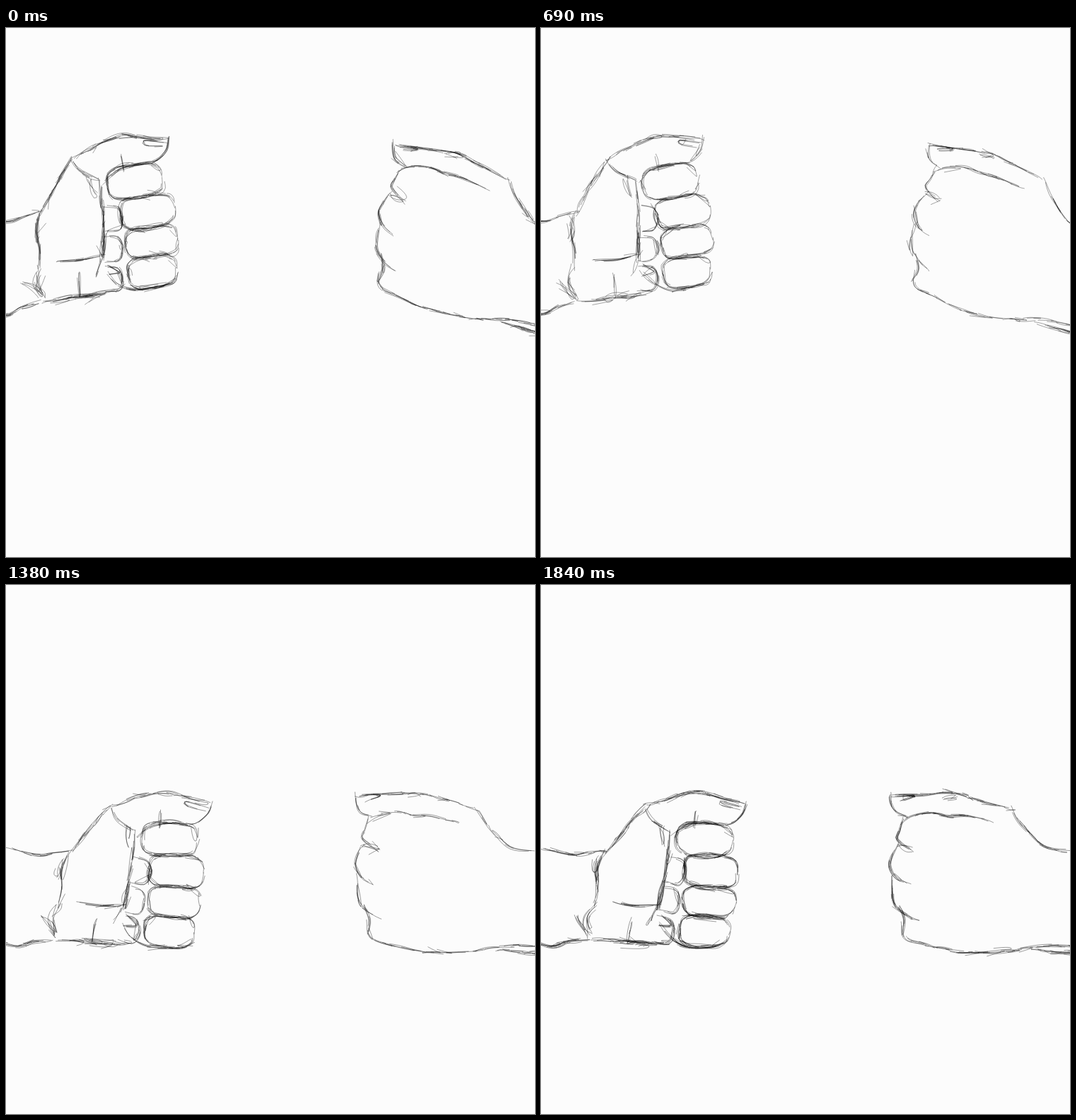
Recreate the animation shown at these times as an HTML page with a canvas. Size 748 px wide and 748 px high, loop 2.07 s.

```html
<!DOCTYPE html>
<html lang="en">
<head>
<meta charset="utf-8">
<title>Two fists</title>
<style>
html, body { margin: 0; width: 100%; height: 100%; overflow: hidden; background: #fcfcfc; }
canvas { display: block; width: 748px; height: 748px; }
</style>
</head>
<body>
<canvas id="stage" width="748" height="748"></canvas>
<script>
const SIZE = 748, HOLD = 230, PAPER = '#fcfcfc';

// Spread across the line, layers of hair, chance of a hook
const PENS = {
  fine: { spread: 1, layers: 2.2, hook: 0.08 },
  soft: { spread: 1.7, layers: 3.4, hook: 0.2 },
  dark: { spread: 2.3, layers: 4.8, hook: 0.22 },
  rough: { spread: 4.2, layers: 4, hook: 0.5 }
};

const parse = text => {
  const [pen, ...spots] = text.split(' ');
  return { pen, points: spots.map(spot => spot.split(',').map(Number)) };
};

// Four stacked fingers; the lower three also show the folded joint
function finger(i) {
  const x = 207 - 24 * ((3 - i) / 3) ** 3, y = 217 + 42.5 * i;
  const wide = 39 - 0.5 * i * i, high = 24 - 0.7 * i, tilt = -0.14;
  const round = v => Math.sign(v) * Math.abs(v) ** 0.65;
  const points = Array.from({ length: 16 }, (_, k) => {
    const a = k * Math.PI / 8, dx = wide * round(Math.cos(a)), dy = high * round(Math.sin(a));
    return [x + dx - dy * tilt, y + dy + dx * tilt];
  });
  const tip = { pen: 'dark', points, closed: true };
  const joint = { pen: 'soft', points: [[141, y - 8], [158, y - 6], [165, y + 8], [160, y + 25], [141, y + 27]] };
  return i ? [tip, joint] : [tip];
}

const nearHand = [
  // thumb
  'dark 93,186 115,173 140,160 167,152 198,155 230,156', 'soft 230,156 228,170 218,184 209,190',
  'fine 229,162 196,159 198,165 222,167', 'soft 211,190 178,195 160,200 146,210 137,218',
  'soft 162,182 165,200', 'soft 93,189 106,203 133,216', 'rough 118,212 127,236',
  // palm
  'dark 132,215 136,245 138,275 135,328', 'dark 138,290 138,325', 'soft 72,329 105,328 138,320',
  'soft 135,328 128,348', 'soft 103,348 104,378', 'dark 52,387 80,383 120,379 158,372',
  'rough 90,381 138,375', 'soft 141,345 158,362 185,371 225,364 241,350', 'soft 145,335 160,345 146,349',
  // wrist and arm
  'soft -45,271 0,274 25,267 50,259', 'dark 48,264 63,236 79,207 95,184', 'soft 49,258 42,285 47,315 46,340',
  'rough 43,270 43,300', 'rough 47,337 41,358 50,382', 'rough 26,360 48,378',
  'dark -40,402 0,406 22,395 48,388'
].map(parse).concat([0, 1, 2, 3].flatMap(finger));

const farHand = [
  // thumb
  'soft 548,161 547,175 551,188 563,197', 'soft 549,163 580,169 635,177 666,192 712,215',
  'soft 552,165 582,171 560,173', 'rough 622,180 636,183',
  'soft 552,205 572,197 598,198 622,207 648,213 682,229',
  // curled fingers and wrist
  'soft 559,198 550,214 545,226 562,245', 'rough 545,236 562,244',
  'soft 545,232 533,247 527,262 533,280 547,292', 'soft 528,275 523,310 533,328 550,343',
  'soft 530,320 533,340 527,357', 'soft 528,343 530,365 555,380 590,396 630,407 682,413',
  'soft 711,214 722,239 748,275 782,289', 'soft 665,412 710,413 748,420 790,428', 'dark 700,416 748,430 790,437'
].map(parse);

// Both fists swing from the thumb tip, mirrored
const hands = [
  { lines: nearHand, high: [231, 157], low: [290, 310], turn: 11 },
  { lines: farHand, high: [547, 160], low: [493, 294], turn: -11 }
];

function seeded(seed) {
  return () => {
    seed = (seed + 0x6D2B79F5) | 0;
    let v = Math.imul(seed ^ (seed >>> 15), 1 | seed);
    v = (v + Math.imul(v ^ (v >>> 7), 61 | v)) ^ v;
    return ((v ^ (v >>> 14)) >>> 0) / 4294967296;
  };
}

// Catmull-Rom curve sampled about every two pixels
function trace(points, closed) {
  const n = points.length, path = [];
  const at = i => points[closed ? (i + n) % n : Math.max(0, Math.min(n - 1, i))];
  for (let i = 0; i < (closed ? n : n - 1); i++) {
    const [p, q, r, s] = [at(i - 1), at(i), at(i + 1), at(i + 2)];
    const count = Math.ceil(Math.hypot(r[0] - q[0], r[1] - q[1]) / 2);
    for (let k = 0; k < count; k++) {
      const u = k / count;
      path.push([0, 1].map(d => {
        const slope = r[d] - p[d];
        const bend = 2 * p[d] - 5 * q[d] + 4 * r[d] - s[d];
        const twist = 3 * (q[d] - r[d]) + s[d] - p[d];
        return q[d] + 0.5 * u * (slope + u * (bend + u * twist));
      }));
    }
  }
  path.push(closed ? path[0] : points[n - 1]);
  return path;
}

function sketch(ctx, line, rand, weight) {
  const pen = PENS[line.pen];
  const jitter = size => (rand() + rand() - 1) * size * 1.5;
  const path = trace(line.points.map(p => p.map(v => v + jitter(0.9))), line.closed);
  const last = path.length - 1;
  const hairs = Math.max(2, Math.round(weight * pen.layers * (last + 4) / 16));

  // Point beside the path; past the ends it runs on along the tangent
  const beside = (i, off) => {
    const k = Math.max(0, Math.min(last, Math.round(i)));
    const p = path[Math.max(0, k - 1)], q = path[Math.min(last, k + 1)];
    const len = Math.hypot(q[0] - p[0], q[1] - p[1]) || 1;
    const tx = (q[0] - p[0]) / len, ty = (q[1] - p[1]) / len, over = (i - k) * 2;
    return [path[k][0] + tx * over - ty * off, path[k][1] + ty * over + tx * off];
  };

  for (let h = 0; h < hairs; h++) {
    const size = Math.min(last + 2, 8 + rand() * 16);
    const start = (h + rand()) / hairs * (last + 4 - size) - 2;
    const from = jitter(pen.spread), to = jitter(pen.spread), bow = jitter(pen.spread);
    ctx.beginPath();
    for (let u = 0; u <= 1; u += 0.125) {
      ctx.lineTo(...beside(start + size * u, from + (to - from) * u + bow * Math.sin(Math.PI * u)));
    }
    if (rand() < pen.hook) {
      const turn = beside(start + size + 2, to + jitter(pen.spread * 2));
      const back = beside(start + size * (0.2 + rand() * 0.5), to + jitter(pen.spread * 2.4));
      ctx.quadraticCurveTo(...turn, ...back);
    }
    ctx.stroke();
  }
}

function drawSheet({ down, weight, seed }) {
  const sheet = document.createElement('canvas');
  sheet.width = sheet.height = SIZE;
  const ctx = sheet.getContext('2d'), rand = seeded(seed);
  ctx.fillStyle = PAPER;
  ctx.fillRect(0, 0, SIZE, SIZE);
  ctx.strokeStyle = 'rgba(0, 0, 0, 0.55)';
  ctx.lineWidth = 0.65;
  ctx.lineCap = ctx.lineJoin = 'round';
  for (const { lines, high, low, turn } of hands) {
    ctx.save();
    if (down) {
      ctx.translate(...low);
      ctx.rotate(turn * Math.PI / 180);
      ctx.translate(-high[0], -high[1]);
    }
    lines.forEach(line => sketch(ctx, line, rand, weight));
    ctx.restore();
  }
  return sheet;
}

const upFirm = drawSheet({ down: false, weight: 1, seed: 41 });
const upLoose = drawSheet({ down: false, weight: 0.75, seed: 58 });
const downFirm = drawSheet({ down: true, weight: 1, seed: 75 });
const downLoose = drawSheet({ down: true, weight: 0.75, seed: 92 });

// One sheet per beat
const beats = [upFirm, upFirm, downLoose, upLoose, downFirm, upLoose, downLoose, upFirm, downFirm];
const stage = document.getElementById('stage').getContext('2d');
const begin = performance.now();

function show() {
  const beat = Math.floor((performance.now() - begin) / HOLD) % beats.length;
  stage.drawImage(beats[beat], 0, 0);
  requestAnimationFrame(show);
}
show();
</script>
</body>
</html>
```
